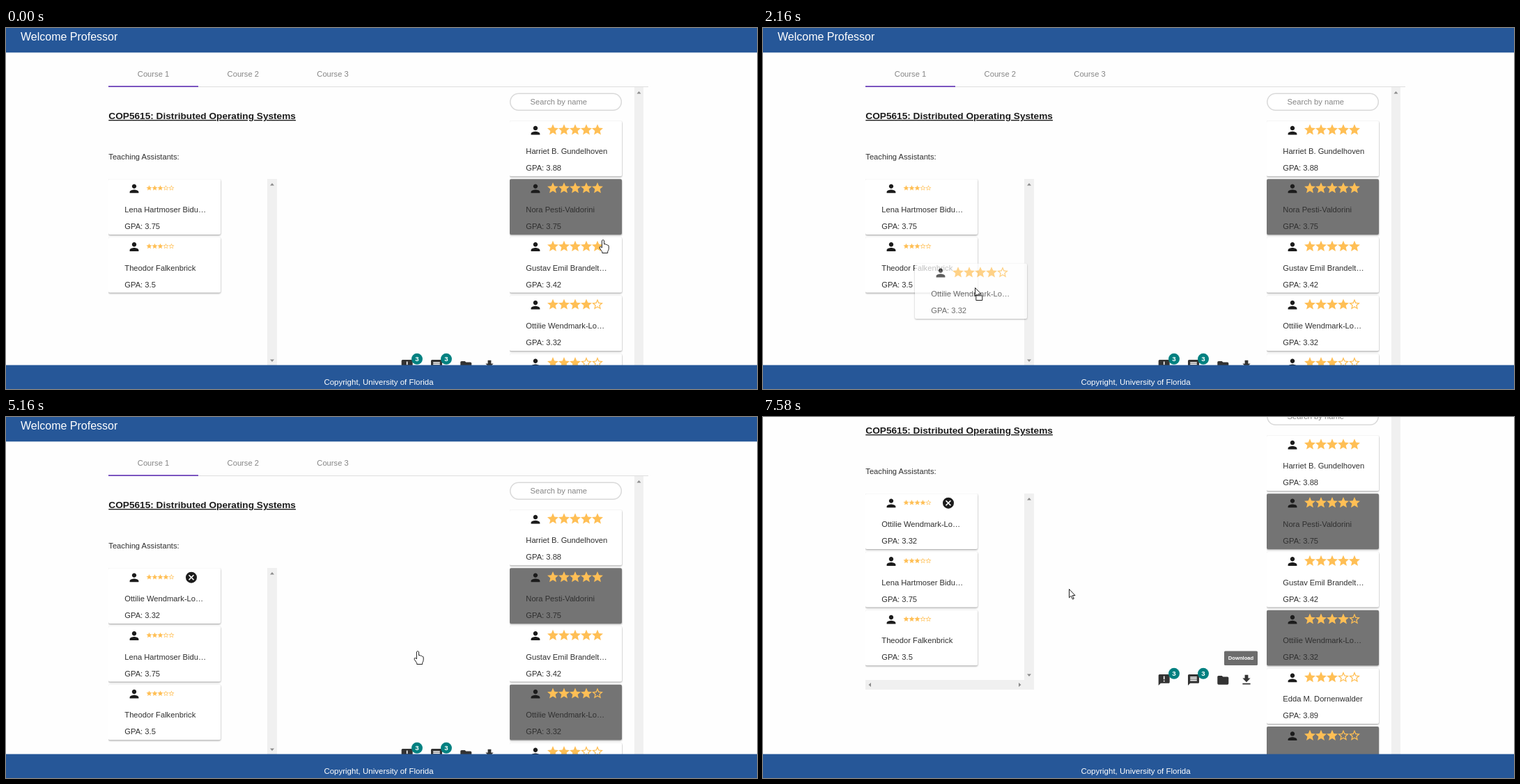
An HTML page that plays this animation: 1078 by 519 pixels, repeating every 8 s.

```html
<!DOCTYPE html>
<html lang="en">
<head>
<meta charset="utf-8">
<title>Course staffing</title>
<style>
  html, body { margin: 0; width: 100%; height: 100%; overflow: hidden; background: #fefefe; }
  svg { display: block; width: 100%; height: 100%; font: 11.2px "Liberation Sans", Arial, sans-serif; fill: #303030; }
  .card { fill: #fff; filter: drop-shadow(0 1px 1px #0006); }
  .card.taken { fill: #747474; }
  .star { fill: #ffbf55; }
  .dark { fill: #1c1c1c; }
  .blue { fill: #265798; }
  .white { fill: #fff; }
  .muted { fill: #858585; }
  .track { fill: #f0f0f0; }
  .arrow { fill: #8c8c8c; }
  .mid { text-anchor: middle; }
  .cursors path, .cursors rect { fill: #fff; stroke: #222; stroke-width: 1; stroke-linejoin: round; }
</style>
</head>
<body>
<svg viewBox="0 0 1078 519">
  <defs>
    <clipPath id="leftClip"><path d="M147 217H375V485H147Z"/></clipPath>
    <clipPath id="rightClip"><path d="M723 133H890V640H723Z"/></clipPath>
  </defs>

  <g id="page">
    <rect class="blue" width="1078" height="35.3"/>
    <text class="white" x="21" y="18" font-size="16">Welcome Professor</text>

    <g class="muted mid">
      <text x="211.5" y="69.5">Course 1</text>
      <text x="340.3" y="69.5">Course 2</text>
      <text x="469" y="69.5">Course 3</text>
    </g>
    <rect x="147" y="84" width="775" height="1" fill="#dedede"/>
    <rect x="147" y="83.2" width="129" height="1.7" fill="#673ab7"/>

    <text x="147.3" y="131" font-size="13.67" font-weight="bold" text-decoration="underline" class="dark">COP5615: Distributed Operating Systems</text>
    <text x="147.3" y="189">Teaching Assistants:</text>

    <g clip-path="url(#leftClip)">
      <g id="before"></g>
      <g id="after"></g>
    </g>
    <path class="track" d="M375 217H389V499H147V485H375ZM902 85H915V640H902Z"/>
    <path class="arrow" d="M379 226.5h6l-3-3.5zM379 476.5h6l-3 3.5zM155 489v6l-3.5-3zM367 489v6l3.5-3zM905.500 94.500h6l-3-3.500z"/>

    <rect x="723.8" y="94.300" width="159.500" height="24" rx="12" fill="#fff" stroke="#d9d9d9" stroke-width="1.500"/>
    <text class="muted" x="752.500" y="110">Search by name</text>
    <g id="students" clip-path="url(#rightClip)"></g>

    <g id="tools" fill="#333"></g>
    <g id="tooltip">
      <rect x="662" y="443.500" width="48" height="20.500" rx="1.600" fill="#6c6c6c"/>
      <text class="white mid" x="686" y="456" font-size="7.600" font-weight="bold">Download</text>
    </g>
  </g>

  <rect class="blue" y="484.600" width="1078" height="35"/>
  <text class="white mid" x="535" y="513" font-size="11.500">Copyright, University of Florida</text>

  <g id="ghost" opacity=".7"></g>
  <g id="pointer" class="cursors">
    <path id="hand" d="M-1.600 1.700Q0-.700 1.600 1.700V6.800Q3.300 5.900 4.300 7.400 5.900 6.700 6.500 8.300 8.200 8 8.200 10V13.200Q8.200 15.300 6.700 17.200V19.500H-1.200V17.800L-4.700 12.800Q-5.500 10.300-3.400 10.200L-1.600 12Z"/>
    <path id="move" d="M0-9 3.500-5.500H1.300V-1.300H5.500V-3.500L9 0 5.500 3.500V1.300H1.300V5.500H3.500L0 9-3.500 5.500H-1.300V1.300H-5.500V3.500L-9 0-5.500-3.500V-1.300H-1.300V-5.500H-3.500Z"/>
    <g id="drag">
      <path d="M.500.500V12.500L3.300 10 5.300 14.700 7.200 13.900 5.200 9.300H9Z"/>
      <rect x="1.800" y="11.800" width="9" height="6.700"/>
    </g>
    <path id="arrow" d="M.500.500V12.800L3.300 10.200 5.400 15 7.300 14.200 5.200 9.500H9Z"/>
  </g>
</svg>

<script>
const $ = id => document.getElementById(id);
const LOOP = 8000, PITCH = 83.7;

// 24-unit icon outlines
const BUBBLE = 'M20 2H4c-1.1 0-2 .9-2 2V22l4-4h14c1.1 0 2-.9 2-2V4c0-1.1-.9-2-2-2z';
const STAR = 'M12 17.27L18.18 21l-1.64-7.03L22 9.24l-7.19-.61L12 2 9.19 8.63 2 9.24l5.46 4.73L5.82 21z';
const ICONS = {
  person: 'M12 12c2.21 0 4-1.79 4-4s-1.79-4-4-4-4 1.79-4 4 1.79 4 4 4zm0 2c-2.67 0-8 1.34-8 4v2h16v-2c0-2.66-5.33-4-8-4z',
  star: STAR,
  hollow: STAR + 'M12 15.4l-3.76 2.27 1-4.28-3.32-2.88 4.38-.38L12 6.1l1.71 4.04 4.38.38-3.32 2.88 1 4.28z',
  cancel: 'M12 2a10 10 0 1 0 0 20a10 10 0 1 0 0-20zM17 15.59L15.59 17 12 13.41 8.41 17 7 15.59 10.59 12 7 8.41 8.41 7 12 10.59 15.59 7 17 8.41 13.41 12z',
  alert: BUBBLE + 'M13 11h-2V5h2zM13 15h-2v-2h2z',
  chat: BUBBLE + 'M18 14H6v-2h12zM18 11H6V9h12zM18 8H6V6h12z',
  folder: 'M10 4H4c-1.1 0-2 .9-2 2V18c0 1.1.9 2 2 2h16c1.1 0 2-.9 2-2V8c0-1.1-.9-2-2-2h-8z',
  download: 'M19 9h-4V3H9v6H5l7 7 7-7zM5 18v2h14v-2z'
};
const icon = (name, x, y, scale = .8, cls = '') =>
  `<path class="${cls}" fill-rule="evenodd" transform="translate(${x} ${y}) scale(${scale}) translate(-12 -12)" d="${ICONS[name]}"/>`;

const person = (name, gpa, rating) => ({ name, gpa, rating });
const ottilie = person('Ottilie Wendmark-Lo…', '3.32', 4);
const students = [
  person('Harriet B. Gundelhoven', '3.88', 5),
  person('Nora Pesti-Valdorini', '3.75', 5),
  person('Gustav Emil Brandelt…', '3.42', 5),
  ottilie,
  person('Edda M. Dornenwalder', '3.89', 3),
  person('', '', 3)
];
const assistants = [
  person('Lena Hartmoser Bidu…', '3.75', 3),
  person('Theodor Falkenbrick', '3.5', 3)
];

function card({ name, gpa, rating }, x, y, { small, taken, closable } = {}) {
  const size = small ? .4 : .8, first = small ? 58.5 : 62;
  const stars = [0, 1, 2, 3, 4].map(i =>
    icon(i < rating ? 'star' : 'hollow', first + i * size * 20, 12.7, size, 'star')).join('');
  return `<g transform="translate(${x} ${y})">
    <rect class="card ${taken ? 'taken' : ''}" width="161" height="79.6" rx="2"/>
    ${icon('person', 37, 13.5, .8, 'dark')}${stars}
    ${closable ? icon('cancel', 119, 13.4, .8, 'dark') : ''}
    <text x="23.3" y="47.6">${name}</text>
    <text x="23.3" y="71.6">${gpa && 'GPA: ' + gpa}</text></g>`;
}
const column = (people, x, y, options) =>
  people.map((p, i) => card(p, x, y + i * PITCH, options(i))).join('');

$('before').innerHTML = column(assistants, 147, 217.3, () => ({ small: true }));
$('after').innerHTML = column([ottilie, ...assistants], 147, 217.3, i => ({ small: true, closable: i === 0 }));
$('students').innerHTML = column(students, 723, 133.6, i => ({ taken: i === 1 || i === 3 || i === 5 }));
$('ghost').innerHTML = card(ottilie, -86, -34.5);

const badge = x => `<circle cx="${x}" cy="475.8" r="8" fill="#008080"/>
  <text class="white mid" x="${x}" y="479.3" font-size="9.8" font-weight="bold">3</text>`;
$('tools').innerHTML = icon('alert', 575.7, 485) + icon('chat', 618, 485) +
  icon('folder', 660.3, 485.3) + icon('download', 694, 485) + badge(590) + badge(632);

const pickedCard = $('students').children[3].querySelector('rect');

// Pointer moves: start, end, number of jumps, pointer shape, way points
const moves = [
  [60, 60, 1, 'hand', [[887, 304]]],
  [300, 980, 13, 'hand', [[820, 340], [761, 390], [809, 417]]],
  [1350, 1570, 6, 'drag', [[776, 412], [690, 395], [590, 375], [490, 358], [410, 346], [370, 344]]],
  [1880, 2630, 16, 'drag', [[338, 345], [270, 400], [233, 425], [261, 425]]],
  [2630, 2630, 1, 'move', [[261, 425]]],
  [2910, 3200, 7, 'move', [[400, 400], [560, 358], [670, 366]]],
  [4380, 4530, 4, 'move', [[669, 372], [658, 365], [646, 355], [635, 349]]],
  [4690, 4690, 1, 'hand', [[635, 349]]],
  [5070, 5280, 5, 'hand', [[580, 333], [543, 323]]],
  [6470, 6470, 1, 'hand', [[563, 326]]],
  [6700, 7000, 6, 'hand', [[640, 357], [698, 374]]],
  [7240, 7580, 7, 'arrow', [[570, 320], [439, 247]]]
];

function pointerAt(t) {
  let shape = 'hand', at = [857, 304];
  for (const [start, end, jumps, kind, points] of moves) {
    if (t < start) break;
    const done = t >= end ? jumps : 1 + Math.floor((t - start) / (end - start) * (jumps - 1));
    const path = [at, ...points];
    const along = done / jumps * points.length;
    const leg = Math.min(Math.floor(along), points.length - 1);
    at = path[leg].map((v, i) => v + (path[leg + 1][i] - v) * (along - leg));
    shape = kind;
  }
  return { shape, at: at.map(Math.round) };
}

const scrollAt = t => t < 5880 ? 0 : t < 5930 ? 6.3 : t < 6200 ? 50 : 107;
const show = (id, visible) => $(id).style.display = visible ? '' : 'none';

function draw(t) {
  const { shape, at } = pointerAt(t);
  const assigned = t >= 4690;
  for (const id of ['hand', 'move', 'drag', 'arrow']) show(id, id === shape);
  for (const id of ['pointer', 'ghost']) $(id).setAttribute('transform', `translate(${at})`);
  show('ghost', shape === 'drag');
  show('before', !assigned);
  show('after', assigned);
  show('tooltip', t >= 7240);
  pickedCard.classList.toggle('taken', assigned);
  $('page').setAttribute('transform', `translate(0 ${-scrollAt(t)})`);
}

const begin = performance.now();
function tick() {
  draw((performance.now() - begin) % LOOP);
  requestAnimationFrame(tick);
}
tick();
</script>
</body>
</html>
```
